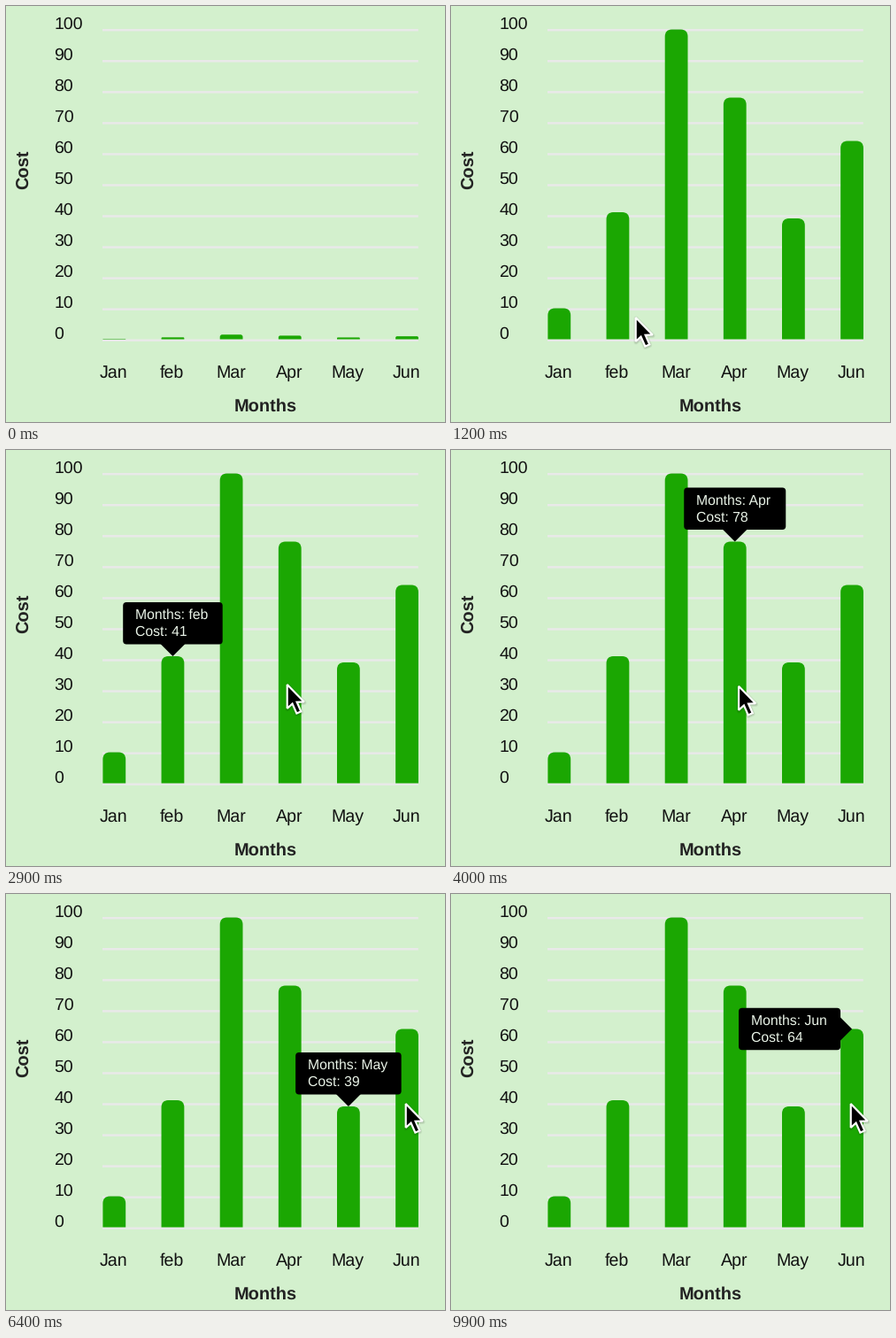
Animation, 496 px wide and 470 px high, one loop 10 s. Source, as a matplotlib script:

```python
import numpy as np
import matplotlib.pyplot as plt
from matplotlib.animation import FuncAnimation
from matplotlib.patches import FancyBboxPatch, PathPatch, Polygon
from matplotlib.path import Path

W, H, DPI = 496, 470, 100
FRAMES, STEP = 100, 100
PX = 72 / DPI

BG, GRID, GREEN = "#d3f0cd", "#e9e9e9", "#1ba702"
MONTHS = ["Jan", "feb", "Mar", "Apr", "May", "Jun"]
COSTS = [10, 41, 100, 78, 39, 64]
BASE, UNIT = 376.5, 3.5
BAR_X, BAR_STEP, BAR_W, RADIUS = 109.4, 66.15, 25.8, 8

plt.rcParams.update({"font.family": "Liberation Sans", "path.snap": False,
                     "text.hinting": "none"})
fig = plt.figure(figsize=(W / DPI, H / DPI), dpi=DPI, facecolor=BG)
ax = fig.add_axes([0, 0, 1, 1])
ax.set(xlim=(0, W), ylim=(H, 0))
ax.axis("off")


def label(x, y, text, size, **kw):
    return ax.text(x, y, text, fontsize=size * PX, va="baseline", **kw)


def smooth(t):
    t = min(max(t, 0), 1)
    return t * t * (3 - 2 * t)


def bar_path(i, grow):
    x0 = BAR_X + i * BAR_STEP
    x1 = x0 + BAR_W
    h = COSTS[i] * UNIT * grow
    top, r = BASE - h, min(RADIUS, h / 2)
    pts = [(x0, BASE), (x0, top + r), (x0, top), (x0 + r, top),
           (x1 - r, top), (x1, top), (x1, top + r), (x1, BASE), (x0, BASE)]
    codes = [Path.MOVETO, Path.LINETO, Path.CURVE3, Path.CURVE3,
             Path.LINETO, Path.CURVE3, Path.CURVE3, Path.LINETO,
             Path.CLOSEPOLY]
    return Path(pts, codes)


def make_tip(i, width, side=False):
    """Tooltip for one bar, with its caret below or on the right."""
    cx = BAR_X + i * BAR_STEP + BAR_W / 2
    peak = BASE - COSTS[i] * UNIT
    height = 47.5
    if side:
        right = cx - 13
        left, top = right - width, peak - height / 2
        caret = [(right - 1, peak - 14), (cx, peak), (right - 1, peak + 14)]
    else:
        left, top = cx - width / 2, peak - 13.5 - height
        caret = [(cx - 14, peak - 14), (cx, peak), (cx + 14, peak - 14)]
    box = FancyBboxPatch((left, top), width, height, fc="black", lw=0,
                         boxstyle="round,pad=0,rounding_size=4", zorder=5)
    parts = [ax.add_patch(box),
             ax.add_patch(Polygon(caret, fc="black", lw=0, zorder=5))]
    lines = [f"Months: {MONTHS[i]}", f"Cost: {COSTS[i]}"]
    for dy, line in zip((19, 38), lines):
        parts.append(label(left + 13.8, top + dy, line, 15.7,
                           color="#e9f3e7", zorder=6))
    return parts


# Axes and titles
for k in range(11):
    y = 377.7 - 35.05 * k
    ax.plot([109, 465.8], [y, y], color=GRID, lw=2.5 * PX,
            solid_capstyle="butt", zorder=1)
    label(54.5, y - 1.4, str(10 * k), 19.5, color="#111111")
for i, month in enumerate(MONTHS):
    label(121.6 + i * BAR_STEP, 420, month, 19.6, ha="center",
          color="#111111")
title = dict(size=20, ha="center", weight="bold", color="#222222")
label(293.5, 458, "Months", **title)
label(26, 185, "Cost", rotation=90, rotation_mode="anchor", **title)

bars = [ax.add_patch(PathPatch(bar_path(i, 1), fc=GREEN, lw=0, zorder=2))
        for i in range(6)]

# Tooltip parts with their start and end times
tips = [(make_tip(1, 112.5), 1900, 3400),
        (make_tip(3, 115), 3400, 4600),
        (make_tip(4, 119.5), 4600, 7300),
        (make_tip(5, 115, side=True), 7300, 20000)]

# Pointer
ARROW = 0.93 * np.array([(0, 0), (0, 29), (6.3, 23.3), (11.5, 35),
                         (16.8, 32.7), (11.8, 21.3), (20.5, 21)])
pointer = [(ax.add_patch(Polygon(ARROW, fc="black", ec="black", lw=w * PX,
                                 alpha=0.07, joinstyle="round", zorder=8)),
            (1, 3)) for w in (1, 3, 5)]
pointer.append((ax.add_patch(Polygon(ARROW, fc="black", ec="white",
                                     lw=2.2 * PX, joinstyle="miter",
                                     zorder=9)), (0.7, 2)))
STOPS = [(1000, 230, 376), (1200, 208, 350), (1600, 189, 326),
         (2300, 189, 326), (2900, 317, 263), (3900, 317, 263),
         (4400, 388, 281), (5300, 388, 281), (6100, 451, 235),
         (10000, 451, 235)]


def pointer_at(ms):
    for (t0, x0, y0), (t1, x1, y1) in zip(STOPS, STOPS[1:]):
        if ms <= t1:
            s = smooth((ms - t0) / (t1 - t0))
            return np.array([x0 + (x1 - x0) * s, y0 + (y1 - y0) * s])


def draw(n):
    ms = n * STEP
    grow = smooth((ms + 78) / 1078)
    for i, bar in enumerate(bars):
        bar.set_path(bar_path(i, grow))

    for parts, start, end in tips:
        shown = np.clip((ms - start + 50) / 100, 0, 1)
        gone = np.clip((ms - end + 50) / 100, 0, 1)
        for part in parts:
            part.set_alpha(shown - gone)

    pos = pointer_at(ms)
    for shape, offset in pointer:
        shape.set_visible(ms >= STOPS[0][0])
        shape.set_xy(ARROW + pos + offset)
    return []


anim = FuncAnimation(fig, draw, frames=FRAMES, interval=STEP, repeat=True,
                     repeat_delay=0, blit=False)
plt.show()
```
